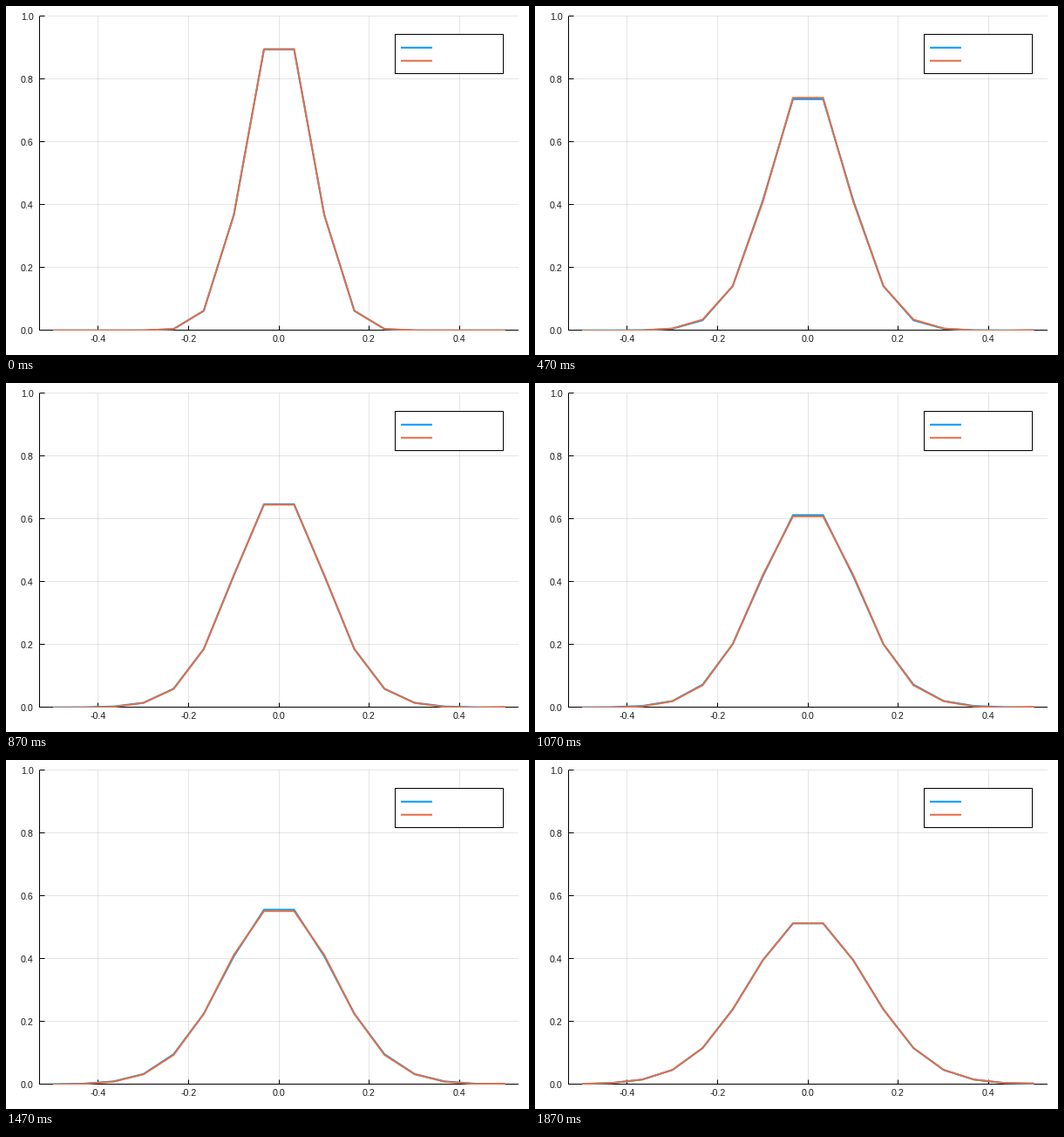
A matplotlib script that plays this animation: 600x400 px, repeating every 1.94 s.

```python
import numpy as np
import matplotlib.pyplot as plt
from matplotlib.animation import FuncAnimation
from matplotlib.patches import Rectangle

W, H, DPI = 600, 400, 100
PX = 72 / DPI                      # points per pixel
LOOP, TICK = 1940, 10              # ms
STEPS = 28
BLUE, ORANGE, INK = "#009afa", "#e36f47", "#1c1c1c"
LEFT, RIGHT, TOP, BOTTOM = 38.5, 588, 11.75, 371.75

plt.rcParams["font.family"] = "Liberation Sans"


def to_x(v):
    return 313.25 + 518.4 * v


def to_y(v):
    return BOTTOM - (BOTTOM - TOP) * v


def crisp(p):
    return np.floor(p) + 0.5


# Heat equation on 16 points with closed ends, solved through its eigenmodes.
N = 16
xs = np.linspace(-0.5, 0.5, N)
lap = np.eye(N, k=1) + np.eye(N, k=-1) - 2 * np.eye(N)
lap[0, 0] = lap[-1, -1] = -1
rates, modes = np.linalg.eigh(lap)
start = modes.T @ np.exp(-100 * xs**2)
RATE = 0.055                       # diffusion number per step

half = np.array([1, -1, 0, 0.5, 0.2, 0, 0, 0])
shape = np.concatenate([half[::-1], half])
tail = np.where(np.abs(xs) > 0.35, 1.0, 0.0)
tail[-1] = 0
edge = np.eye(N)[-1]


def data(k):
    return modes @ (np.exp(rates * RATE * k) * start)


def model(k):
    s = k / STEPS
    swing = 0.0052 * np.sin(2 * np.pi * s**0.779)
    sag = -0.0015 * np.sin(np.pi * s)
    return data(k) + swing * shape + sag * tail + 0.002 * np.sqrt(s) * edge


fig = plt.figure(figsize=(W / DPI, H / DPI), dpi=DPI, facecolor="white")
ax = fig.add_axes([0, 0, 1, 1])
ax.set(xlim=(0, W), ylim=(H, 0))
ax.axis("off")


def stroke(x, y, color="black", width=1, **kw):
    kw.setdefault("solid_capstyle", "butt")
    return ax.plot(x, y, color=color, lw=width * PX, snap=False, **kw)[0]


def label(x, y, text, ha="left", color=INK):
    ax.text(x, y, text, ha=ha, va="baseline", color=color, fontsize=10.67 * PX)


base = crisp(BOTTOM)
for v in np.linspace(-0.4, 0.4, 5):
    x = crisp(to_x(v))
    stroke([x, x], [TOP, BOTTOM], alpha=0.1, zorder=1)
    stroke([x, x], [base, base - 5], zorder=2)
    label(x - 0.3, 384.8, f"{v + 0:.1f}", "center")
for v in np.linspace(0, 1, 6):
    y = crisp(to_y(v))
    stroke([LEFT, RIGHT], [y, y], alpha=0.1, zorder=1)
    stroke([LEFT, LEFT + 6], [y, y], zorder=2)
    label(31.5, y + 4.2, f"{v:.1f}", "right")
stroke([LEFT, LEFT], [TOP, base + 0.5], zorder=2)
stroke([LEFT - 0.5, RIGHT], [base, base], zorder=2)

area = Rectangle((38, 11), 550, 361, transform=ax.transData)
curves = []
for color, solve in ((BLUE, data), (ORANGE, model)):
    line = stroke(to_x(xs), to_y(solve(0)), color, 2, zorder=3,
                  solid_joinstyle="round")
    line.set_clip_path(area)
    curves.append((line, solve))

ax.add_patch(Rectangle((446.5, 32.5), 124, 45, fc="white", ec="black",
                       lw=PX, snap=False, zorder=4))
for y, color, name in ((47.75, BLUE, "Data"), (62.75, ORANGE, "Neural PDE")):
    stroke([453, 489], [y, y], color, 2, zorder=5)
    label(493, y + 4, name, color="black")


def update(i):
    k = min(int((i + 0.5) * TICK * 0.015), STEPS)   # 15 steps per second
    for line, solve in curves:
        line.set_ydata(to_y(solve(k)))
    return [line for line, _ in curves]


anim = FuncAnimation(fig, update, frames=LOOP // TICK, interval=TICK,
                     repeat=True, repeat_delay=0, blit=False)
plt.show()
```
